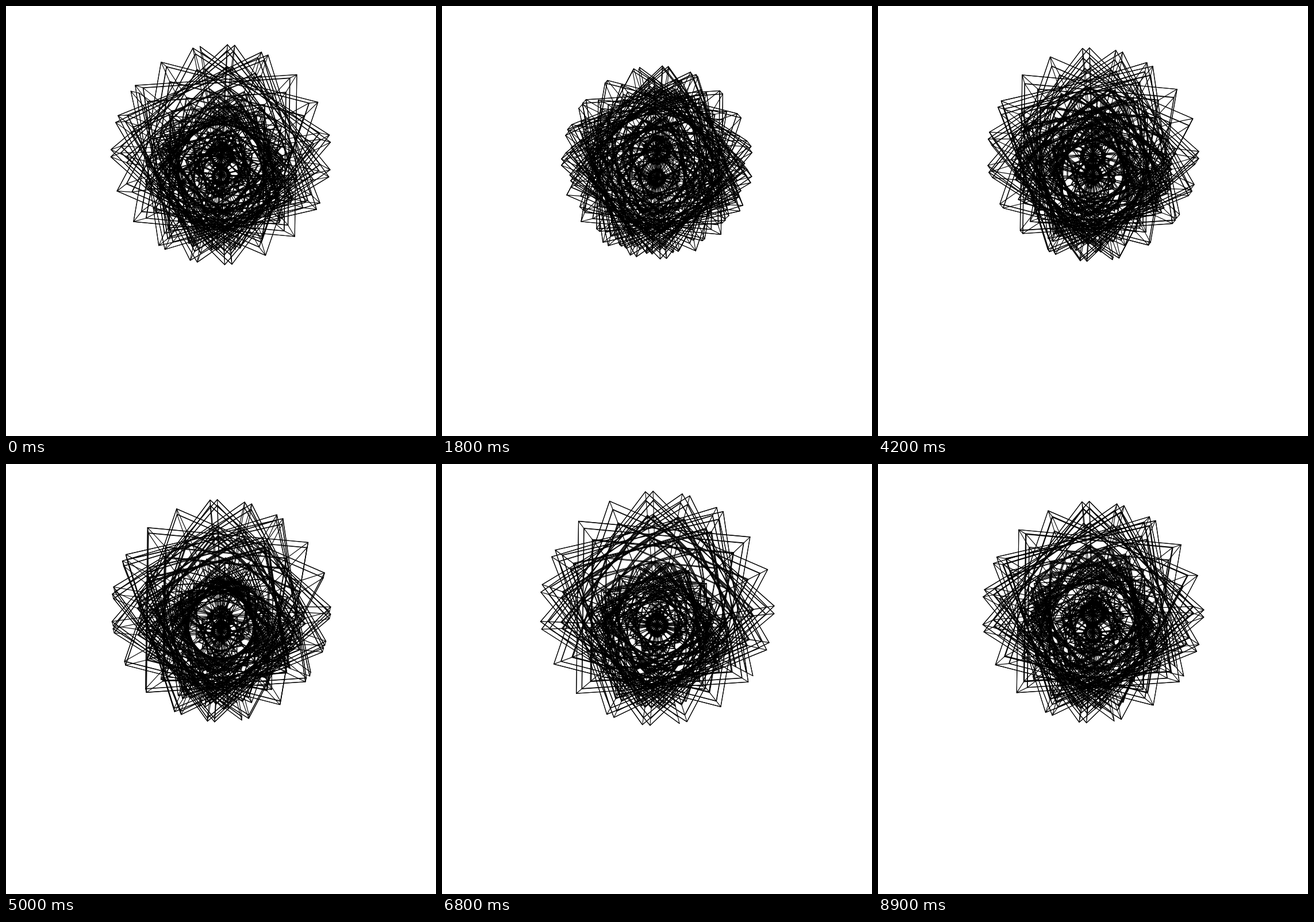
An HTML page with a canvas that plays this animation: 748x748 px, repeating every 9000 ms.

```html
<!DOCTYPE html>
<html lang="en">
<head>
<meta charset="utf-8">
<title>Wireframe shell</title>
<style>
  html, body { margin: 0; width: 100%; height: 100%; overflow: hidden; background: #fff; }
  canvas { display: block; width: 748px; height: 748px; }
</style>
</head>
<body>
<canvas id="stage" width="748" height="748"></canvas>
<script>
const ctx = document.getElementById('stage').getContext('2d');
const SIZE = 748, MID = SIZE / 2;
const FOCAL = MID / Math.tan(Math.PI / 6);
const LIFT = SIZE / 8;
const RADIUS = 156;
const LOOP = 9000, TICK = 100;
const COUNT = 31;
const RING_STEP = 0.4495, SPIN_STEP = 1.65;
const rad = deg => deg * Math.PI / 180;
const RING_START = rad(186.5), SPIN_START = rad(349);

// Each ring keeps its signed radius; only its depth swings with the phase.
// The rings wrap round the shell twice, almost covering the first pass.
function ringPoints(k, phase) {
  const theta = RING_START + k * RING_STEP;
  const scale = FOCAL / (FOCAL - RADIUS * Math.cos(theta - phase));
  const r = RADIUS * Math.sin(theta) * scale;
  const cy = MID - LIFT * scale;
  return Array.from({ length: COUNT }, (_, n) => {
    const a = SPIN_START + n * SPIN_STEP;
    return [MID + r * Math.sin(a), cy - r * Math.cos(a)];
  });
}

function polyline(points) {
  ctx.beginPath();
  points.forEach(([x, y], i) => i ? ctx.lineTo(x, y) : ctx.moveTo(x, y));
  ctx.stroke();
}

function draw(ms) {
  const tick = Math.floor((ms % LOOP) / TICK);
  const phase = rad(46.5 - 2 * tick);
  const rings = Array.from({ length: COUNT }, (_, k) => ringPoints(k, phase));

  ctx.fillStyle = '#fff';
  ctx.fillRect(0, 0, SIZE, SIZE);
  ctx.strokeStyle = '#000';
  ctx.lineWidth = 1.1;
  ctx.lineJoin = 'round';
  ctx.lineCap = 'round';

  rings.forEach(polyline);
  for (let n = 0; n < COUNT; n++) polyline(rings.map(ring => ring[n]));
}

const start = performance.now();
function loop() {
  draw(performance.now() - start);
  requestAnimationFrame(loop);
}
loop();
</script>
</body>
</html>
```
